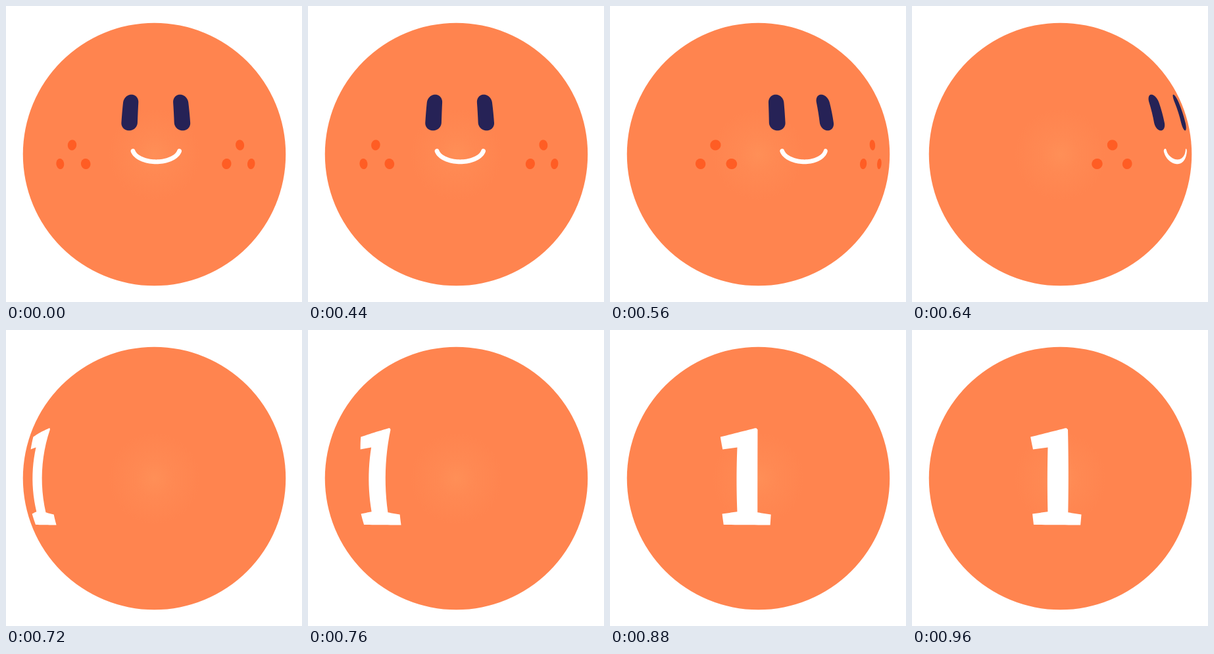
An HTML page with a canvas that plays this animation: 450 by 450 pixels, repeating every 1 s.

```html
<!DOCTYPE html>
<html lang="en">
<head>
<meta charset="utf-8">
<title>Turning ball</title>
<style>
  html, body { margin: 0; width: 100%; height: 100%; overflow: hidden; background: #fff; }
  canvas { display: block; width: 450px; height: 450px; }
</style>
</head>
<body>
<canvas id="stage" width="450" height="450"></canvas>
<script>
const ctx = document.getElementById('stage').getContext('2d');
const C = 225.5, R = 199.75, TURN = 200, RAD = Math.PI / 180;
const LOOP = 1000, STEP = 40, START = 400, STEPS = 14;

// half width of the ball at height y
const halfWidth = y => Math.sqrt(R * R - (y - C) ** 2);

// flat stage point -> [longitude in degrees, y]
const toBall = ([x, y]) => [Math.asin((x - C) / halfWidth(y)) / RAD, y];

function ellipse(lon, y, rx, ry) {
  return Array.from({ length: 48 }, (_, i) => {
    const a = i / 24 * Math.PI;
    return [lon + rx * Math.cos(a), y + ry * Math.sin(a)];
  });
}

function subdivide(points, n = 12) {
  return points.flatMap(([x, y], i) => {
    const [u, v] = points[(i + 1) % points.length];
    return Array.from({ length: n }, (_, j) => [x + (u - x) * j / n, y + (v - y) * j / n]);
  });
}

// upright pill: top and bottom halves of an ellipse, joined by straight sides
function pill(lon, top, bottom, rx, ry) {
  const pts = [];
  for (let i = 0; i <= 24; i++) {
    const a = Math.PI + i / 24 * Math.PI;
    pts.push([lon + rx * Math.cos(a), top + ry + ry * Math.sin(a)]);
  }
  for (let i = 0; i <= 24; i++) {
    const a = i / 24 * Math.PI;
    pts.push([lon + rx * Math.cos(a), bottom - ry + ry * Math.sin(a)]);
  }
  return subdivide(pts, 4);
}

// outline of a thick arc with round ends
function smile(cx, cy, rx, ry, from, to, w) {
  const outer = [], inner = [], n = 40;
  const at = a => [cx + rx * Math.cos(a), cy + ry * Math.sin(a)];
  const normal = a => Math.atan2(rx * Math.sin(a), ry * Math.cos(a));
  const off = ([x, y], dir) => [x + w * Math.cos(dir), y + w * Math.sin(dir)];
  const cap = (a, turn) => Array.from({ length: 11 }, (_, i) =>
    off(at(a), normal(a) + turn + i / 10 * Math.PI));
  for (let i = 0; i <= n; i++) {
    const a = (from + (to - from) * i / n) * RAD;
    outer.push(off(at(a), normal(a)));
    inner.unshift(off(at(a), normal(a) + Math.PI));
  }
  return [...outer, ...cap(to * RAD, 0), ...inner, ...cap(from * RAD, Math.PI)];
}

const INK = '#262256', SPOT = '#ff5d24', WHITE = '#fff';

const spots = [
  [-46, 240], [-31.6, 240], [-38.9, 211.4],
  [33.5, 240], [47.7, 240], [40.8, 211.4]
];

const one = [
  [180.2, 162.6], [232.8, 149.3], [235, 149.2], [237, 151.5],
  [237.3, 277.3], [257.5, 280.6], [256.1, 296.5],
  [185, 296], [183.1, 279.6], [206.4, 276.2],
  [206.5, 178.4], [184, 181.5]
];

const shapes = [
  ...spots.map(([lon, y]) => ({ color: SPOT, pts: ellipse(lon, y, 2.45, 8) })),
  { color: INK, pts: pill(-11.28, 134.6, 189.4, 3.7, 12) },
  { color: INK, pts: pill(12.67, 134.6, 189.4, 3.7, 12) },
  { color: WHITE, pts: smile(228.3, 216.5, 36, 20.3, 11, 169, 3.4).map(toBall) },
  { color: WHITE, pts: subdivide(one.map(toBall)).map(([lon, y]) => [lon - TURN, y]) }
];

// cubic-bezier(.65, 0, .35, 1)
function ease(p) {
  let lo = 0, hi = 1;
  for (let i = 0; i < 30; i++) {
    const s = (lo + hi) / 2, q = 1 - s;
    if (1.95 * s * q * q + 1.05 * s * s * q + s ** 3 < p) lo = s; else hi = s;
  }
  return lo * lo * (3 - 2 * lo);
}

const glow = ctx.createRadialGradient(C, C, 0, C, C, 70);
glow.addColorStop(0, '#ff8f57');
glow.addColorStop(0.4, '#ff8953');
glow.addColorStop(1, '#ff844f');

function draw(ms) {
  const step = Math.floor((ms - START) / STEP);
  const p = Math.min(1, Math.max(0, step / STEPS));
  const angle = p === 0 ? 0 : p === 1 ? TURN : TURN * ease(p);

  ctx.fillStyle = WHITE;
  ctx.fillRect(0, 0, 450, 450);
  ctx.fillStyle = glow;
  ctx.beginPath();
  ctx.arc(C, C, R, 0, 2 * Math.PI);
  ctx.fill();

  for (const { color, pts } of shapes) {
    const lons = pts.map(([lon]) => lon + angle);
    if (lons.every(l => Math.abs(l) >= 90)) continue;
    ctx.fillStyle = color;
    ctx.beginPath();
    pts.forEach(([, y], i) => {
      const lon = Math.max(-90, Math.min(90, lons[i]));
      ctx.lineTo(C + halfWidth(y) * Math.sin(lon * RAD), y);
    });
    ctx.fill();
  }
}

const begin = performance.now();
function tick() {
  draw((performance.now() - begin) % LOOP);
  requestAnimationFrame(tick);
}
tick();
</script>
</body>
</html>
```
